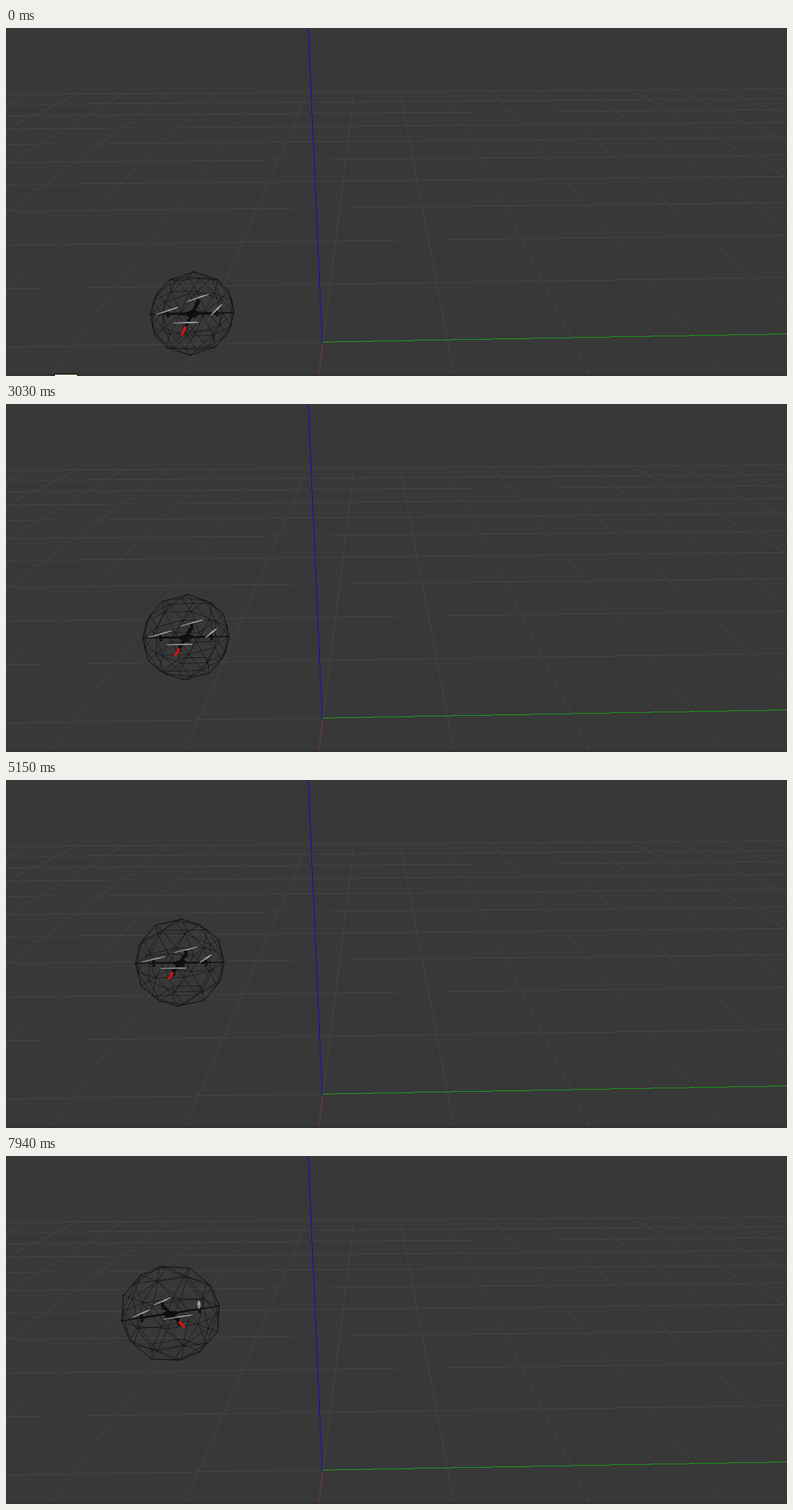
These frames come from a looping animation (1120 by 500 pixels, 8 s). An HTML page with a canvas:

```html
<!DOCTYPE html>
<html lang="en">
<head>
<meta charset="utf-8">
<title>Caged drone climbing</title>
<style>
html, body { margin: 0; width: 100%; height: 100%; overflow: hidden; background: #383838; }
canvas { display: block; }
</style>
</head>
<body>
<canvas id="stage" width="1120" height="500"></canvas>
<script>
const stage = document.getElementById('stage');
const ctx = stage.getContext('2d');
const W = 1120, H = 500, FLOOR = 497, LOOP = 8000, END = 7940;
const clamp01 = v => Math.max(0, Math.min(1, v));
const span = (t, a, b) => clamp01((t - a) / (b - a));

// hard-edged line, one pixel per step along its longer side
function pixelLine(g, x0, y0, x1, y1, color) {
  const n = Math.ceil(Math.max(Math.abs(x1 - x0), Math.abs(y1 - y0)));
  g.fillStyle = color;
  for (let i = 0; i <= n; i++) {
    const x = Math.floor(x0 + (x1 - x0) * i / n), y = Math.floor(y0 + (y1 - y0) * i / n);
    if (y < FLOOR) g.fillRect(x, y, 1, 1);
  }
}

// ground grid in perspective plus the three world axes, drawn once
function buildGround() {
  const c = document.createElement('canvas');
  c.width = W;
  c.height = H;
  const g = c.getContext('2d'), grid = '#444';
  g.fillStyle = '#383838';
  g.fillRect(0, 0, W, H);
  const vx = 525, vy = -119;
  for (let j = 0; j <= 10; j++) {
    const x = 453 + j * 4.6, y = vy + 3350 / (5.878 + j);
    const s = .0071 + .0097 * (y - 92) / 359;
    pixelLine(g, 0, y + s * x, W, y - s * (W - x), grid);
  }
  for (let k = -10; k <= 10; k++) {
    const x = 499 + 66.2 * k, y = 92 - .47 * k, s = (x - vx) / (y - vy);
    pixelLine(g, x, y, x + s * (H - y), H, grid);
  }
  pixelLine(g, 453.5, 451, 448, H, '#703030');
  pixelLine(g, 453.5, 451.3, W, 439.5, '#1a9e1a');
  pixelLine(g, 433.5, 0, 453.5, 451, '#1008d0');
  g.fillStyle = '#343434';
  g.fillRect(0, FLOOR, W, H - FLOOR);
  return c;
}

function drawTip() {
  ctx.fillStyle = '#000';
  ctx.fillRect(69, 497, 34, 3);
  ctx.fillStyle = '#ffffdc';
  ctx.fillRect(70, 498, 32, 2);
}

// point around the vertical axis as [forward, right, up]
function polar(az, r, z) {
  const a = az * Math.PI / 180;
  return [r * Math.cos(a), r * Math.sin(a), z];
}

// icosahedron with a pole up, every edge split once
function buildCage() {
  const base = [[0, 0, 1], [0, 0, -1]], z = Math.sqrt(.2);
  for (let i = 0; i < 5; i++) base.push(polar(72 * i, 2 * z, -z), polar(72 * i + 36, 2 * z, z));
  const dist = (a, b) => Math.hypot(...a.map((v, n) => v - b[n]));
  const pairs = (list, reach) => list.flatMap((a, i) =>
    list.slice(i + 1).filter(b => dist(a, b) < reach).map(b => [a, b]));
  const mids = pairs(base, 1.1).map(([a, b]) => {
    const m = a.map((v, n) => v + b[n]), l = Math.hypot(...m);
    return m.map(v => v / l);
  });
  return pairs(base.concat(mids), .7);
}

const GROUND = buildGround();
const CAGE = buildCage();
const RAIL = [72, 144, 216, 288].map(az => polar(az, .526, -.72));

// travel in ms of full speed: speeds up, cruises, brakes
function travel(t) {
  const ramp = (a, b) => t < b ? (b - a) * span(t, a, b) ** 2 / 2 : t - (a + b) / 2;
  return ramp(530, 908) - ramp(6250, 7050);
}

// projected centre, size and axes of the drone
function pose(t) {
  const z = travel(t) / 1000, turn = span(t, 6700, END);
  const rise = 31.6 * z + .39 * z * z;
  const nod = .09 * Math.sin(Math.PI * span(t, 6100, 7600));
  const fx = -.24 + .514 * turn;
  const fy = .5 - .0336 * z + nod - .03 * turn;
  const ry = -.025 + .003 * z - .143 * turn;
  return {
    cx: 267 - .12 * rise - 7 * turn,
    cy: 410.3 - rise + 17 * turn * turn,
    r: 60.3 + .81 * z + 5.4 * turn,
    fx, fy, ry,
    ux: -.1 + .02 * turn,
    uy: -Math.sqrt(1 - fy * fy - ry * ry)
  };
}

function drawDrone(t) {
  const p = pose(t), dark = '#0e0e0e';
  const trace = pts => {
    ctx.beginPath();
    pts.forEach(([f, s, u]) => ctx.lineTo(
      p.cx + p.r * (f * p.fx + s * .995 + u * p.ux),
      p.cy + p.r * (f * p.fy + s * p.ry + u * p.uy)));
  };
  const rod = (pts, color, width) => {
    trace(pts);
    ctx.strokeStyle = color;
    ctx.lineWidth = width;
    ctx.stroke();
  };
  const fill = (pts, color) => {
    trace(pts);
    ctx.fillStyle = color;
    ctx.fill();
  };
  const motor = (f, s) => {
    rod([[f, s, -.09], [f, s, .07]], dark, 4);
    rod([[f, s, -.06], [f, s, -.01]], '#3c1010', 2);
  };
  // thin two-bladed rotor lying along (f, s)
  const prop = (cf, cs, f, s) => {
    const blade = (from, color) => {
      const pts = [];
      for (let i = 0; i <= 8; i++) {
        const a = from + Math.PI * i / 8, c = Math.cos(a), n = .12 * Math.sin(a);
        pts.push([cf + c * f + n * s, cs + c * s - n * f, .09]);
      }
      fill(pts, color);
      rod([[cf, cs, .09], pts[4]], color, 1);
    };
    blade(Math.PI / 2, '#8a8a8a');
    blade(-Math.PI / 2, '#a4a4a4');
  };

  ctx.lineJoin = 'round';
  CAGE.forEach(e => rod(e, 'rgba(8,8,8,.7)', .8));
  rod(RAIL, 'rgba(8,8,8,.7)', .8);

  rod([[-.62, 0, 0], [0, 0, 0]], dark, 4.5);
  motor(-.59, 0);
  prop(-.59, 0, -.17, .225);
  rod([[0, -1, 0], [0, 1, 0]], dark, 1.5);
  rod([[0, -.6, 0], [0, .6, 0]], dark, 2.6);
  motor(0, -.59);
  motor(0, .59);
  prop(0, -.59, -.17, .225);
  prop(0, .59, -.26, .07);
  fill(Array.from({ length: 16 }, (_, i) => polar(i * 22.5, .16, 0)), dark);
  rod([[0, -.1, -.06], [0, .1, -.06]], '#141414', 6);
  rod([[0, 0, 0], [.62, 0, 0]], dark, 4);
  motor(.59, 0);
  rod([[.62, 0, 0], [1.04, 0, 0]], '#dc1010', 3.4);
  prop(.59, 0, 0, .3);
}

const start = performance.now();
function frame() {
  const t = (performance.now() - start) % LOOP;
  ctx.drawImage(GROUND, 0, 0);
  drawDrone(t);
  if (t < 270) drawTip();
  requestAnimationFrame(frame);
}
frame();
</script>
</body>
</html>
```
